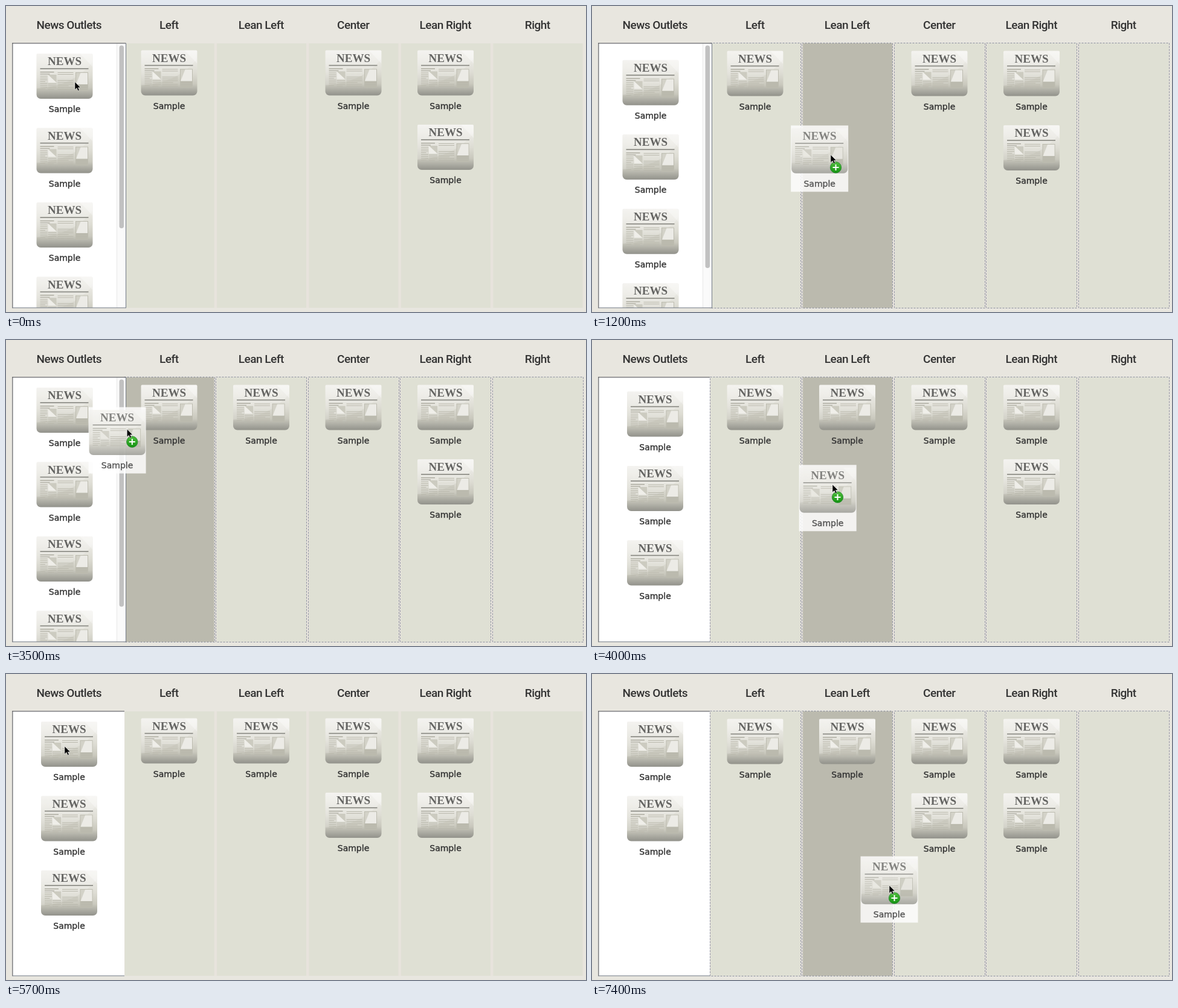
An HTML page with a canvas that plays this animation: 960 px wide and 508 px high, repeating every 7.5 s.

```html
<!DOCTYPE html>
<html lang="en">
<head>
<meta charset="utf-8">
<title>Sorting news outlets</title>
<style>
  html, body { margin: 0; width: 100%; height: 100%; overflow: hidden; background: #e8e6df; }
  canvas { display: block; }
</style>
</head>
<body>
<canvas id="stage" width="960" height="508"></canvas>
<script>
const ctx = document.getElementById('stage').getContext('2d');
const LOOP = 7500, TICK = 100, STEP = 123.5, PITCH = 152.5;
const HIDE_TIME = 400, GHOST_DELAY = 17;
const TITLES = ['Left', 'Lean Left', 'Center', 'Lean Right', 'Right'];
const HEADING = '500 19px Roboto, sans-serif';

// A drag holds the card at (dx, dy); its list slot starts to close at `hide`.
const DRAGS = [
  { from: 500, hide: 876, to: 2100, dx: 64.5, dy: 44 },
  { from: 3300, hide: 3659, to: 4800, dx: 54, dy: 28 },
  { from: 6100, hide: 6543, to: LOOP, dx: 36.5, dy: 38 }
];

// The pointer rests between eased moves.
const REST = { x: 114, y: 126 };
const MOVES = [
  { from: 400, to: 1200, x: 395, y: 247 },
  { from: 1200, to: 2000, x: 480, y: 274 },
  { from: 2300, to: 2500, x: 149, y: 62 },
  { from: 2500, to: 2900, x: 112, y: 107 },
  { from: 3200, to: 4000, x: 398, y: 240 },
  { from: 4000, to: 4800, x: 580, y: 262 },
  { from: 4800, to: 5400, x: 147, y: 184 },
  { from: 5500, to: 5700, x: 97, y: 120 },
  { from: 6000, to: 6900, x: 305, y: 242 },
  { from: 6900, to: 7900, x: 679, y: 460 }
];

// Cosine ease from 0 to 1.
const ease = k => (1 - Math.cos(Math.PI * Math.min(1, Math.max(0, k)))) / 2;

function pointerAt(t) {
  return MOVES.reduce((p, move) => {
    const k = ease((t - move.from) / (move.to - move.from));
    return { x: p.x + (move.x - p.x) * k, y: p.y + (move.y - p.y) * k };
  }, REST);
}

function rect(x, y, w, h, color) {
  ctx.fillStyle = color;
  ctx.fillRect(x, y, w, h);
}

function shape(points, color) {
  ctx.beginPath();
  points.forEach(([x, y]) => ctx.lineTo(x, y));
  ctx.closePath();
  ctx.fillStyle = color;
  ctx.fill();
}

function rounded(x, y, w, h, radius, color) {
  ctx.beginPath();
  ctx.roundRect(x, y, w, h, radius);
  ctx.fillStyle = color;
  ctx.fill();
}

function text(value, x, y, font, color, spacing = 0, weight = 0) {
  ctx.font = font;
  ctx.letterSpacing = spacing + 'px';
  ctx.textAlign = 'center';
  ctx.fillStyle = ctx.strokeStyle = color;
  ctx.fillText(value, x + spacing / 2, y);
  if (weight) {
    ctx.lineWidth = weight;
    ctx.strokeText(value, x + spacing / 2, y);
  }
}

function fade(y0, y1, ...colors) {
  const g = ctx.createLinearGradient(0, y0, 0, y1);
  colors.forEach((c, i) => g.addColorStop(i / (colors.length - 1), c));
  return g;
}

function textLines(x, y, w, count) {
  for (let i = 0; i < count; i++) rect(x, y + i * 3, i % 4 == 3 ? w * .7 : w, 1, '#b9b8ac');
}

function newspaper() {
  ctx.save();
  rounded(0, 0, 93, 75, [2, 2, 7, 7], fade(0, 75, '#f1f0ec', '#e9e8e2', '#dddcd3', '#c9c8bd', '#92928b'));
  ctx.clip();
  ctx.beginPath();
  ctx.moveTo(0, 58);
  ctx.quadraticCurveTo(62, 54, 93, 14);
  ctx.lineTo(93, 0);
  ctx.lineTo(0, 0);
  ctx.fillStyle = 'rgba(255,255,255,.18)';
  ctx.fill();
  shape([[72, 0], [93, 0], [93, 22]], 'rgba(255,255,255,.3)');
  ctx.restore();

  text('NEWS', 46.5, 19, 'bold 19px "Liberation Serif", serif', '#646462');
  rect(6, 24.3, 80, 1.6, '#85857f');
  rect(6, 30, 23, 1.4, '#aaa99e');
  rect(6, 33.3, 16, 1.4, '#b1b0a5');
  textLines(6, 37, 12, 8);
  textLines(35, 31, 26, 2);
  textLines(35, 44, 26, 6);
  textLines(19, 50, 14, 4);
  rect(19, 35, 14, 13, '#cccbc0');
  shape([[19, 35], [33, 48], [19, 48]], '#efeee9');
  rect(64.5, 31, 21, 31, '#bcbbaf');
  rect(65.5, 32, 19, 19, '#d3d2c8');
  shape([[73, 32], [84.5, 32], [84.5, 51], [65.5, 51]], '#ecebe6');
  textLines(66, 53, 18, 3);
}

// x is the centre, y the top of the picture.
function card(x, y) {
  ctx.save();
  ctx.translate(x - 46.5, y);
  newspaper();
  text('Sample', 46.5, 97, '14px "DejaVu Sans", sans-serif', '#333', 0, .4);
  ctx.restore();
}

function columns(dragging, hovered, counts) {
  TITLES.forEach((title, i) => {
    const x = 195.5 + i * PITCH, center = 270 + i * PITCH;
    text(title, center, 38, HEADING, '#333', -.5);
    rect(x - 1.5, 62, PITCH, 439, '#e7e3dc');
    rect(x + 1, 62, 148, 439, dragging && i == hovered ? '#bbbaae' : '#dfe0d4');
    if (dragging) {
      ctx.strokeStyle = '#8b8f9e';
      ctx.lineWidth = 1;
      ctx.setLineDash([3, 2]);
      ctx.strokeRect(Math.round(x) - .5, 61.5, 150, 440);
      ctx.setLineDash([]);
    }
    for (let n = 0; n < counts[i]; n++) card(center, 73.5 + dragging + n * STEP);
  });
}

function outletList(t, dragging) {
  const gone = DRAGS.filter(d => d.hide <= t);
  const slot = gone.length ? 1 - ease((t - gone.at(-1).hide) / HIDE_TIME) : 0;
  const left = 5 - gone.length, content = 14 + STEP * (left + slot);
  const scrolls = content > 440;
  const center = scrolls ? 97 : 104.5, right = scrolls ? 198 : 196 - dragging;

  text('News Outlets', 104.5, 38, HEADING, '#333', -.5);
  rect(11, 62, right - 11, 439, '#fff');
  ctx.save();
  ctx.beginPath();
  ctx.rect(11, 62, 187, 439);
  ctx.clip();
  for (let n = 0; n < left; n++) card(center, 79 + (n + slot) * STEP);
  if (scrolls) {
    rect(183, 62, 15, 439, '#fafafa');
    rect(183, 62, 1, 439, '#e8e8e8');
    rounded(187.5, 65.5, 7.5, 191600 / content, 4, '#c1c1c1');
    ctx.restore();
    rect(198, 61.5, 1, 440, '#737a86');
  } else {
    ctx.restore();
  }
  rect(10.4, 61.4, right - 10.4, 1, '#44474c');
  rect(10.4, 61.4, 1, 440, '#44474c');
  rect(10.4, 500.5, right - 10.4, 1, '#737a86');
}

function ghost(x, y) {
  ctx.globalAlpha = .82;
  rect(x - 1, y - 4.5, 95, 110, '#fff');
  ctx.globalAlpha = .78;
  card(x + 46.5, y);
  ctx.globalAlpha = 1;
}

function badge(x, y) {
  ctx.beginPath();
  ctx.arc(x, y, 9.2, 0, 7);
  ctx.fillStyle = fade(y - 9, y + 9, '#4fbe3c', '#149312');
  ctx.fill();
  ctx.strokeStyle = '#23822a';
  ctx.lineWidth = .8;
  ctx.stroke();
  rect(x - 5, y - 1, 10, 2, '#fff');
  rect(x - 1, y - 5, 2, 10, '#fff');
}

function pointer(x, y) {
  ctx.save();
  ctx.translate(x, y);
  ctx.scale(.92, .92);
  shape([[0, 0], [0, 14], [3.3, 11], [5.6, 16], [8, 15], [5.8, 10.2], [10, 10]], '#000');
  ctx.strokeStyle = 'rgba(255,255,255,.7)';
  ctx.lineWidth = .8;
  ctx.stroke();
  ctx.restore();
}

function draw(t) {
  const { x, y } = pointerAt(t);
  const drag = DRAGS.find(d => t >= d.from && t < d.to);
  const dragging = drag ? 1 : 0;
  const hovered = Math.floor((x - 196) / PITCH);
  rect(0, 0, 960, 508, '#e8e6df');
  columns(dragging, hovered, [1, +(t >= DRAGS[0].to), 1 + (t >= DRAGS[1].to), 2, 0]);
  outletList(t, dragging);
  if (drag) {
    const trail = pointerAt(t - GHOST_DELAY);
    ghost(trail.x - drag.dx, trail.y - drag.dy);
    if (hovered >= 0) badge(x + 8.5, y + 21);
  }
  pointer(x, y);
}

const start = performance.now();
function frame() {
  const t = (performance.now() - start) % LOOP;
  draw(Math.floor(t / TICK) * TICK);
  requestAnimationFrame(frame);
}
frame();
</script>
</body>
</html>
```
